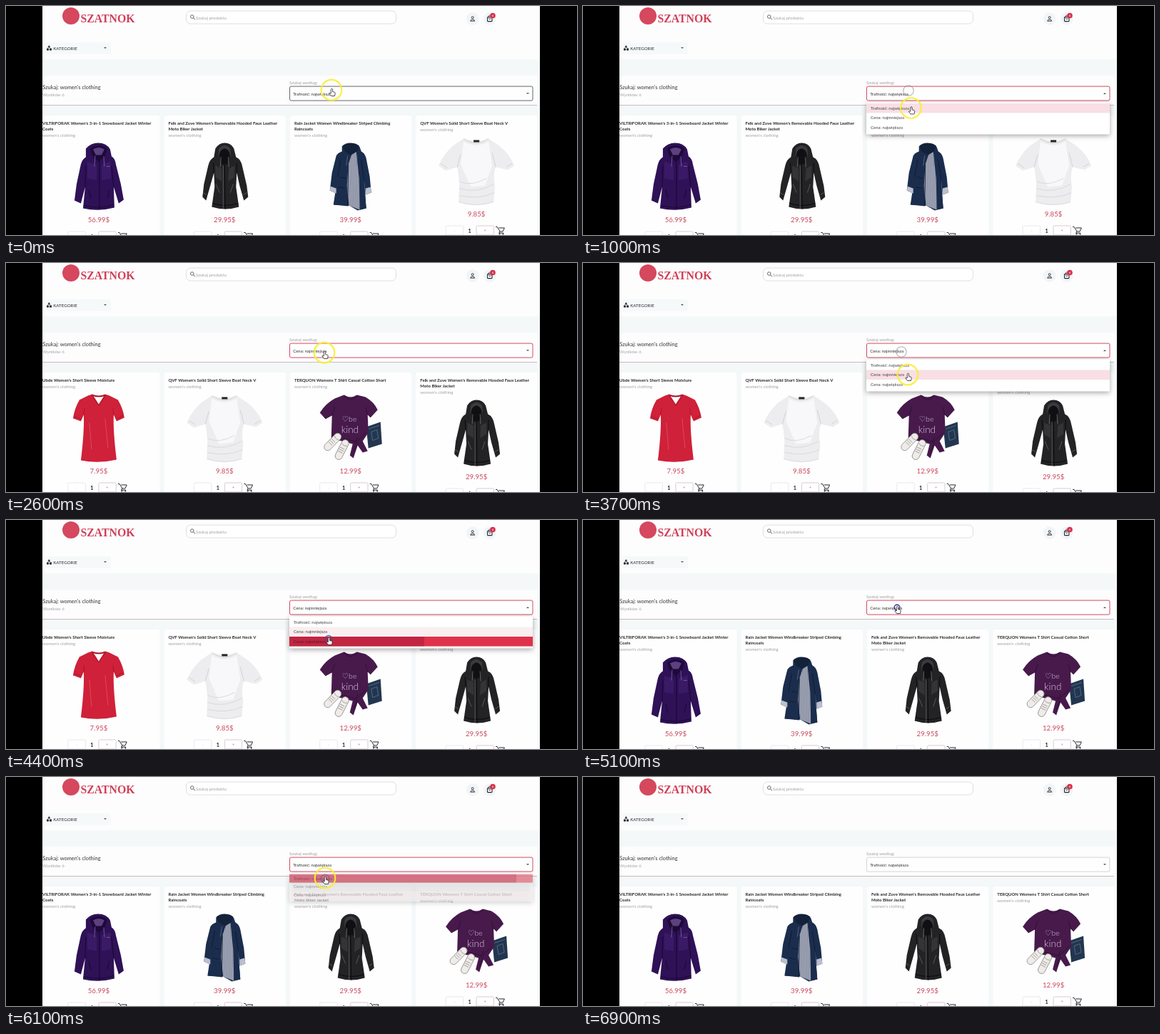
These frames come from a looping animation (800 by 322 pixels, 7000 ms). An HTML page with a canvas:

```html
<!DOCTYPE html>
<html lang="pl">
<head>
<meta charset="utf-8">
<title>Sortowanie wyników</title>
<style>
  html, body { margin: 0; width: 100%; height: 100%; overflow: hidden; background: #000; }
  canvas { display: block; width: 800px; height: 322px; }
</style>
</head>
<body>
<canvas id="stage"></canvas>
<script>
const W = 800, H = 322, LOOP = 7000, STEP = 100;
const RED = '#d5485e', HOT = '#e0324a', PALE = '#f4f8f9', INK = '#2b2b33';
const canvas = document.getElementById('stage');
const g = canvas.getContext('2d');
const dpr = window.devicePixelRatio || 1;
canvas.width = W * dpr;
canvas.height = H * dpr;

const clamp = v => Math.max(0, Math.min(1, v));
const smooth = v => v * v * (3 - 2 * v);

// Drawing helpers
function fill(color, d) {
  g.fillStyle = color;
  g.fill(new Path2D(d));
}
function line(color, width, d) {
  g.strokeStyle = color;
  g.lineWidth = width;
  g.stroke(new Path2D(d));
}
function rect(color, x, y, w, h) {
  g.fillStyle = color;
  g.fillRect(x, y, w, h);
}
function box(x, y, w, h, r, bg, border, bw = 1) {
  g.beginPath();
  g.roundRect(x, y, w, h, r);
  if (bg) { g.fillStyle = bg; g.fill(); }
  if (border) { g.strokeStyle = border; g.lineWidth = bw; g.stroke(); }
}
function disc(x, y, r, bg, border, bw = 1) {
  g.beginPath();
  g.arc(x, y, r, 0, 7);
  if (bg) { g.fillStyle = bg; g.fill(); }
  if (border) { g.strokeStyle = border; g.lineWidth = bw; g.stroke(); }
}
function text(str, x, y, size, color, weight = 400, align = 'left', family = 'Lato, sans-serif') {
  g.font = `${weight} ${size}px ${family}`;
  g.textAlign = align;
  g.fillStyle = color;
  g.fillText(str, x, y);
}
function at(x, y, draw) {
  g.save();
  g.translate(x, y);
  draw();
  g.restore();
}
function stripes(d, color, x0, x1, slant) {
  g.save();
  g.clip(new Path2D(d));
  for (let x = x0; x < x1; x += 2.2) line(color, 0.7, `M${x} 10 L${x + slant} 96`);
  g.restore();
}

// Garments, drawn from the top centre of the picture
function purpleJacket() {
  fill('#2f1157', 'M-18 20 L-18 8 Q-11 0 -1 0 Q11 0 16 9 L18 19 Q23 22 24 30 L31 58 L35 80 L28 85 L21 62 L22 91 Q0 97 -22 92 L-19 62 L-25 85 L-34 81 L-31 58 L-25 30 Q-23 23 -18 20 Z');
  fill('#1d0a38', 'M-12 8 Q0 -1 12 8 L9 18 L0 27 L-9 18 Z');
  fill('#5d4080', 'M-8 9 Q0 4 8 9 L4 17 L-4 17 Z');
  fill('#3a1a66', 'M-16 26 L-3 31 L-3 52 L-16 50 Z M4 30 L17 26 L17 50 L4 52 Z');
  line('#180730', 1, 'M-19 62 L-18 32 M21 62 L18 32 M1 26 L1 94 M-14 66 L-11 78 M15 66 L12 78 M-21 88 Q1 94 21 87');
  line('#8a70a8', 0.7, 'M-5 18 L-6 33 M7 19 L8 33 M11 33 h5');
}
function leatherJacket() {
  fill('#232325', 'M-15 20 L-13 8 Q-8 0 0 0 Q9 0 13 8 L16 20 Q23 23 25 34 L31 60 L33 76 L27 81 L21 60 L17 42 L16 62 L20 90 Q1 96 -18 90 L-14 62 L-15 42 L-20 60 L-26 81 L-31 76 L-29 58 L-23 32 Q-21 23 -15 20 Z');
  fill('#101012', 'M-8 12 Q0 2 8 12 L4 30 L-4 30 Z');
  fill('#3b3b3f', 'M-8 8 Q0 -1 8 8 L9 20 L6 12 Q0 4 -6 12 L-9 20 Z');
  fill('#343437', 'M-13 32 L-4 36 L-4 54 L-13 48 Z M6 36 L14 32 L14 48 L5 54 Z');
  line('#0a0a0c', 1, 'M-15 42 L-16 28 M17 42 L17 28 M0 30 L1 93 M-17 85 Q1 91 19 85');
  line('#6c6c70', 0.7, 'M-2 32 L-2 92 M-12 58 L-7 70 M12 58 L8 70 M-30 70 L-25 73 M31 70 L26 73');
  line('#8c8c90', 0.6, 'M-5 20 L-6 34 M5 20 L6 34');
}
function rainJacket() {
  const lining = 'M-3 16 L10 12 L14 50 L13 94 L-2 88 L-7 50 Z';
  fill('#1b2d4d', 'M-12 5 Q-8 0 0 0 Q10 0 13 6 L15 12 Q20 14 22 22 L27 48 L29 70 L21 73 L19 52 L22 92 L10 95 L-2 88 L-24 87 L-18 48 L-20 71 L-29 67 L-26 42 L-20 18 Q-18 14 -12 12 Z');
  fill('#a9aebd', lining);
  stripes(lining, '#6c7389', -10, 16, 2);
  fill('#1b2d4d', 'M-11 8 L3 12 L-3 30 L-5 60 L-3 89 L-23 87 L-17 46 Z M8 11 L15 12 L18 44 L22 92 L13 94 L12 50 Z');
  fill('#132139', 'M-11 4 Q1 -3 12 4 L9 12 L1 17 L-8 12 Z');
  fill('#bcc0cd', 'M21 64 L28 62 L29 70 L21 73 Z M-28 61 L-20 64 L-20 71 L-29 67 Z');
  line('#0d182c', 0.8, 'M-18 48 L-14 24 M19 52 L15 24 M-17 62 L-8 64 M-14 48 L-6 50 M-3 30 L-4 88');
  line('#79839a', 0.6, 'M-4 18 L-6 32 M8 18 L9 32');
}
function whiteTee() {
  fill('#ededf0', 'M-18 2 Q0 8 17 2 L32 12 Q47 24 53 40 L44 46 L27 42 Q23 52 26 70 L24 91 Q0 99 -25 91 L-24 66 Q-25 52 -27 42 L-43 47 L-53 40 Q-46 24 -33 12 Z');
  fill('#f8f8fa', 'M-18 6 Q0 16 17 6 L22 40 L12 68 L-8 70 L-22 38 Z');
  line('#cfcfd4', 0.9, 'M-18 2 Q0 15 17 2 M-27 42 L-22 24 M27 42 L22 22 M-50 37 L-41 43 M50 37 L42 42');
  line('#d6d6db', 0.9, 'M-24 62 Q-8 70 14 58 M-24 72 Q0 80 24 66 M-24 82 Q4 88 25 78 M-25 91 Q0 99 24 91');
  rect('#222', -4, 4, 8, 3);
}
function redTee() {
  fill('#cf2139', 'M-15 2 L-9 0 Q0 4 9 0 L15 2 L27 8 Q34 20 36 33 L25 38 L21 29 Q20 52 25 92 Q0 98 -25 93 Q-20 52 -21 29 L-25 38 L-36 34 Q-34 20 -27 8 Z');
  fill('#8f1326', 'M-9 1 Q0 4 9 1 L1 8 Z');
  fill('#fff', 'M-7 3 Q0 5 7 3 L0 14 Z');
  line('#a5152b', 0.9, 'M-10 1 L0 16 L10 1 M-21 29 L-20 20 M21 29 L20 20 M-34 31 L-25 35 M34 30 L25 35');
  line('#e0475b', 1, 'M-13 40 L-10 78 M9 34 L13 76');
}
function kindTee() {
  fill('#22364f', 'M22 46 L42 39 L44 70 L25 76 Z');
  line('#5d748f', 0.8, 'M25 49 L40 44 M29 53 L37 50 L39 62 L31 65 Z');
  fill('#471a4b', 'M-22 6 L-9 1 Q0 7 9 1 L21 4 Q33 11 38 22 L28 33 L24 29 L25 54 L17 66 L24 80 L17 82 L10 72 L4 90 L-1 86 L3 70 L-27 62 L-26 30 L-35 35 L-43 26 Q-35 13 -22 6 Z');
  line('#2e1034', 1, 'M-9 2 Q0 13 9 2 M-26 30 L-22 18 M24 29 L21 18 M-26 58 L8 67 L22 54 M10 68 L4 82 M10 60 L6 69');
  text('♡be', -12, 38, 10.5, '#dccbe0', 300);
  text('kind', -13, 54, 13.5, '#dccbe0', 300);
  for (const [x, y, a] of [[-25, 67, -0.8], [-12, 78, -1.1]]) {
    at(x, y, () => {
      g.rotate(a);
      box(-15, -5, 30, 10, 5, '#eeebe8', '#8e8a89', 0.8);
      line('#8a8685', 0.7, 'M-4 -4 v7 M-1 -4 v7 M2 -4 v7 M8 -4 Q5 0 8 4');
    });
  }
}

const items = {
  purple: { title: ["VILTRIFORAK Women's 3-in-1 Snowboard Jacket Winter", 'Coats'], price: '56.99$', draw: purpleJacket },
  leather: { title: ["Felk and Zuve Women's Removable Hooded Faux Leather", 'Moto Biker Jacket'], price: '29.95$', draw: leatherJacket },
  rain: { title: ['Rain Jacket Women Windbreaker Striped Climbing', 'Raincoats'], price: '39.99$', draw: rainJacket },
  white: { title: ["QVF Women's Solid Short Sleeve Boat Neck V"], price: '9.85$', draw: whiteTee },
  red: { title: ["Ubde Women's Short Sleeve Moisture"], price: '7.95$', draw: redTee },
  kind: { title: ['TERQUON Womens T Shirt Casual Cotton Short'], price: '12.99$', draw: kindTee }
};
const orders = {
  relevance: ['purple', 'leather', 'rain', 'white'],
  cheapest: ['red', 'white', 'kind', 'leather'],
  dearest: ['purple', 'rain', 'leather', 'kind']
};
const options = ['Trafność: największa', 'Cena: najmniejsza', 'Cena: największa'];

// Timeline
const clicks = [
  { t: 400, x: 456, y: 119 },
  { t: 1750, x: 459, y: 153 },
  { t: 3100, x: 446, y: 125 },
  { t: 4200, x: 452, y: 167 },
  { t: 5000, x: 440, y: 123 },
  { t: 5700, x: 447, y: 143 }
];
const menus = [
  { press: 400, open: 500, pick: 1750, close: 2100, sel: 0 },
  { press: 3100, open: 3200, pick: 4200, close: 4500, sel: 1 },
  { press: 5000, open: 5100, pick: 5700, close: 6000, sel: 2 }
];
const trail = [
  [0, 456, 118], [100, 453, 119], [200, 456, 118], [700, 457, 119], [1100, 460, 148],
  [1200, 460, 152], [1800, 459, 152], [2100, 459, 152], [2500, 446, 126], [3400, 446, 126],
  [3700, 455, 157], [3800, 454, 160], [3900, 453, 166], [4000, 452, 167], [4400, 452, 167],
  [4900, 440, 123], [5200, 440, 123], [5600, 447, 142], [7000, 447, 142]
];
function pointer(t) {
  const i = Math.max(1, trail.findIndex(k => k[0] > t));
  const [a, ax, ay] = trail[i - 1], [b, bx, by] = trail[i];
  const p = smooth((t - a) / (b - a));
  return { x: ax + (bx - ax) * p, y: ay + (by - ay) * p };
}

function arrow(x, y, up) {
  const s = up ? -1 : 1;
  fill('#555', `M${x - 2} ${y - s} h4 l-2 ${2 * s} Z`);
}

function header() {
  rect('#fdfdfe', 51, 0, 698, H);
  disc(91, 14, 12, RED);
  text('SZATNOK', 104.5, 23, 15.8, '#cf3f57', 700, 'left', '"Liberation Serif", serif');
  box(252.5, 7, 294, 18, 6, '#fff', '#dfdfe3');
  disc(260.8, 15, 2.3, null, '#555', 0.9);
  line('#555', 1, 'M262.5 16.7 L265 19.2');
  text('Szukaj produktu', 266, 18.6, 6.1, '#a0a0a4');

  disc(653.7, 18, 9, '#f2f5f7');
  disc(653.7, 16.2, 1.5, null, INK, 0.9);
  line(INK, 0.9, 'M650.7 21.2 Q650.7 19 653.7 19 Q656.7 19 656.7 21.2 Z');
  disc(677.8, 18, 9, '#f2f5f7');
  box(674.5, 15.6, 6.5, 6, 0.6, null, INK, 1.1);
  line(INK, 0.9, 'M676 15.6 Q676 13 677.8 13 Q679.6 13 679.6 15.6 M676 17.3 Q677.8 20 679.6 17.3');
  disc(682, 13.5, 3.8, '#d8304b');
  text('6', 682, 15.2, 4.6, '#fff', 400, 'center');

  box(55, 51, 92, 17, 2, '#f6f9fa');
  fill(INK, 'M60.3 55 l2 3.5 h-4 Z M61 59.5 h3 v3 h-3 Z');
  disc(58.5, 61, 1.7, INK);
  text('KATEGORIE', 66.3, 61.7, 6.15, INK);
  arrow(139, 59, false);

  rect(PALE, 51, 75, 698, 23);
  rect(PALE, 745, 98, 4, 42);
  text("Szukaj: women's clothing", 51.3, 117.2, 7.45, '#333');
  text('Wyników 6', 51.3, 127, 6.1, '#a3a3a7');
  rect(PALE, 51, 140, 698, H - 140);
  rect('#cbb9bd', 51, 139, 693, 1);
}

function quantity(cx, y) {
  box(cx - 43, y - 6.5, 24.5, 13, 1.5, '#fff', '#e6e6e9', 0.9);
  text('-', cx - 30.8, y + 2, 6, '#c4c4c8', 400, 'center');
  text('1', cx - 9.5, y + 3.3, 7.2, '#222', 700, 'center');
  box(cx, y - 6.5, 24.3, 13, 1.5, '#fff', '#d6c4cf', 0.9);
  text('+', cx + 12, y + 2, 5.5, '#c0607a', 400, 'center');
  at(cx + 33, y, () => {
    line(INK, 1, 'M-6 -5 h2 l4 6.5 h4 l2.3 -5 h-8 M-0.2 1.5 l-1.2 2.2 h6.5');
    disc(-0.6, 5, 1, INK);
    disc(4.4, 5, 1, INK);
  });
}

function card(item, i) {
  const x = 45.4 + 176.4 * i, cx = x + 84.5;
  const drop = (item.title.length - 1) * 8;
  box(x, 154, 170, 190, 3, '#fefefe');
  item.title.forEach((row, n) => text(row, x + 5.7, 167 + 8 * n, 6, '#2a2a2c', 700));
  text("women's clothing", x + 5.7, 175.5 + drop, 6.05, '#a0a0a4');
  at(cx, 184.5 + drop, item.draw);
  text(item.price, cx, 296 + drop, 9.7, '#cb4a60', 400, 'center');
  quantity(cx, 315.5 + drop);
}

function field(t, value, open) {
  text('Szukaj według:', 397, 110.2, 6.05, '#a0a0a4');
  const border = t < 400 ? '#66666a' : t < 6900 ? RED : '#d4d4d7';
  box(397.5, 113, 340.5, 20, 2, '#fefefe', border);
  text(value, 402.2, 125.6, 6.03, '#333');
  arrow(731, 123, open);
}

function menu(m, t, p) {
  const show = clamp((t - m.open) / 200) * (1 - clamp((t - m.close) / 200));
  if (show <= 0) return;
  g.save();
  g.globalAlpha = show;
  g.translate(0, 136);
  g.scale(1, 0.75 + 0.25 * show);
  g.translate(0, -136);
  g.shadowColor = 'rgba(0,0,0,.35)';
  g.shadowBlur = 7 * dpr;
  g.shadowOffsetY = 2 * dpr;
  box(397, 135.5, 341, 45, 1.5, '#fff');
  g.shadowColor = 'transparent';
  options.forEach((label, i) => {
    const y = 136.8 + 13.6 * i;
    const over = p.y >= y && p.y < y + 13.6;
    const sel = i === m.sel;
    if (sel || over) rect(sel ? (over ? '#f8dfe5' : '#f9eef0') : HOT, 397, y, 341, 13.6);
    if (over && !sel && t > m.pick) {
      g.save();
      g.beginPath();
      g.rect(397, y, 341, 13.6);
      g.clip();
      disc(p.x, p.y, (t - m.pick) * 0.67, 'rgba(150,20,55,.42)');
      g.restore();
    }
    text(label, 403, y + 9, 6.03, over && !sel ? '#5c1626' : '#444');
  });
  g.restore();
}

function cursor(t, p) {
  let pressed = false;
  for (const c of clicks) {
    const age = t - c.t;
    if (age < 0 || age >= 850) continue;
    if (age < 300) pressed = true;
    const fade = clamp(age / 700);
    disc(c.x, c.y, 3.2 + age / 150, null, `rgba(${45 + 90 * fade},${45 + 90 * fade},${150 - 10 * fade},${1 - 0.5 * fade})`, 1.7 - 0.7 * fade);
  }
  if (t >= 6300) return;
  if (!pressed) disc(p.x, p.y, 14.3, null, 'rgba(250,238,50,.9)', 2.2);
  at(p.x + 0.5, p.y - 0.5, () => {
    const d = 'M-1.2 0 Q-1.2 -1.2 0 -1.2 Q1.1 -1.2 1.1 0 V3 L3.8 3.7 Q4.9 4.1 4.7 5.3 L4 9 H-1 L-3.7 5.2 Q-3.2 4 -1.2 5.3 Z';
    fill('#fff', d);
    line('#222', 0.8, d);
  });
}

function render(t) {
  const p = pointer(t);
  const order = t < 2300 ? 'relevance' : t < 4700 ? 'cheapest' : 'dearest';
  const chosen = t < 2200 ? 0 : t < 4600 ? 1 : t < 6100 ? 2 : 0;
  const active = menus.find(m => t >= m.press && t < m.close + 200);
  g.setTransform(dpr, 0, 0, dpr, 0, 0);
  rect('#000', 0, 0, W, H);
  g.save();
  g.beginPath();
  g.rect(51, 0, 697, H);
  g.clip();
  header();
  orders[order].forEach((id, i) => card(items[id], i));
  field(t, options[chosen], !!active && t < active.close);
  if (active) menu(active, t, p);
  cursor(t, p);
  g.restore();
}

const start = performance.now();
function tick() {
  const t = (performance.now() - start + 15) % LOOP;
  render(Math.floor(t / STEP) * STEP);
  requestAnimationFrame(tick);
}
tick();
</script>
</body>
</html>
```
